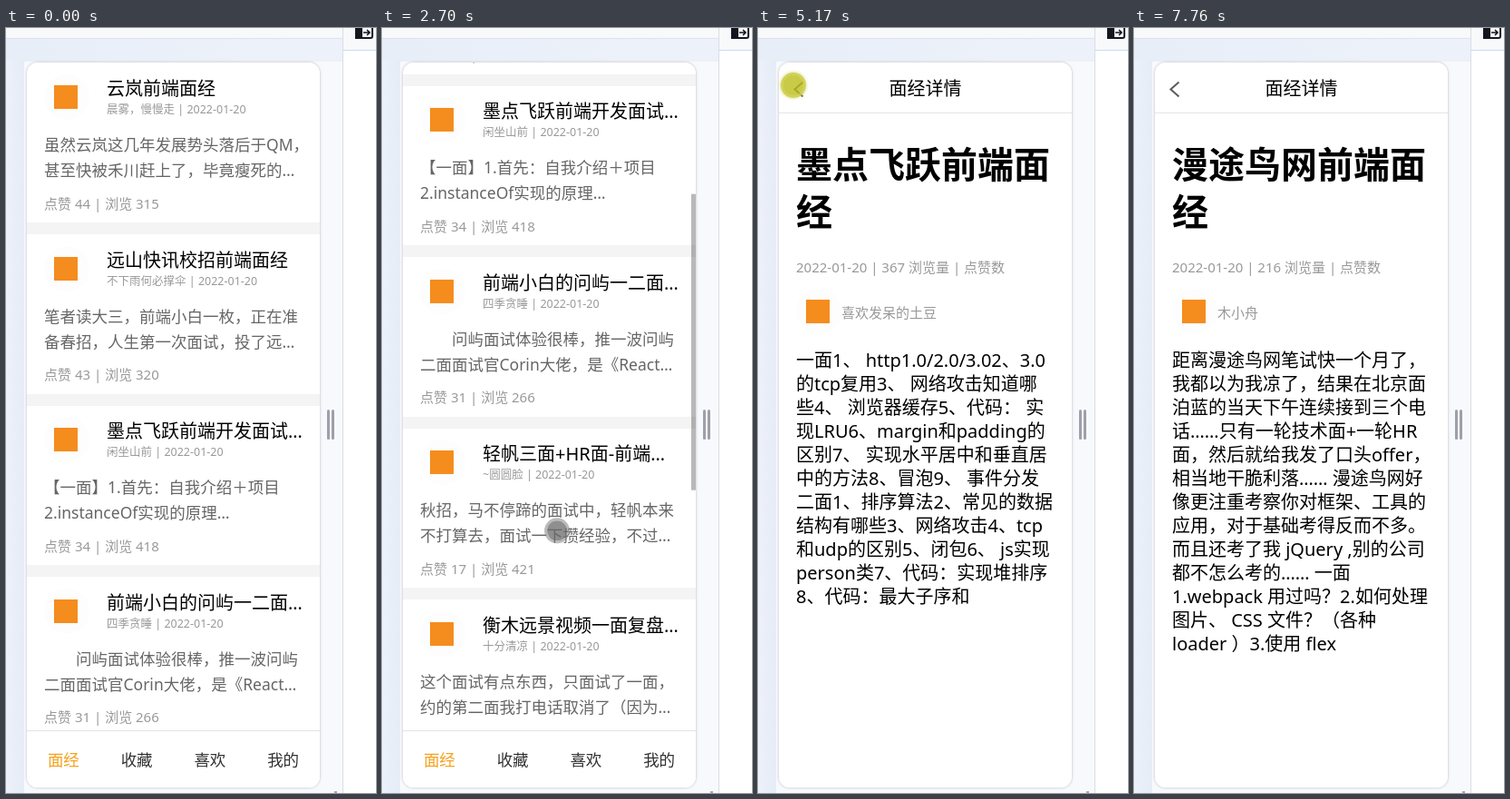
Write an HTML page that moves like this. It is 408 px wide and 842 px high and loops after 8150 ms.

```html
<!DOCTYPE html>
<html lang="zh-CN">
<head>
<meta charset="utf-8">
<title>面经</title>
<style>
html, body { margin: 0; width: 100%; height: 100%; overflow: hidden; }
body { position: relative; background: #f8f9fc; font-family: "Noto Sans", "Noto Sans CJK SC", "Noto Sans CJK", sans-serif; color: #000; }
div, svg { position: absolute; box-sizing: border-box; }
.text { white-space: pre; }
.top { left: 0; top: 0; width: 371px; height: 12px; background: #f8f9fb; border-bottom: 1px solid #dde2ec; }
.band { left: 0; top: 12px; width: 371px; height: 25px; background: linear-gradient(90deg, #e8eef8, #edf2fa); }
.side { left: 0; top: 36px; width: 20px; height: 806px; background: linear-gradient(90deg, #ecf1fa, #e6ecf7); }
.panel { left: 371px; top: 0; width: 37px; height: 842px; background: #fff; border-left: 1px solid #d9dce2; }
.bar { left: 0; top: 0; width: 36px; height: 25px; background: #f8f9fb; border-bottom: 1px solid #c9dcf5; }
.grip { top: 420px; width: 3px; height: 33px; border-radius: 2px; background: #9f9faa; }
.corner { left: 362px; top: 840px; width: 3px; height: 2px; background: #aaa; }
.phone { left: 23px; top: 38px; width: 323px; height: 798px; border-radius: 12px; overflow: hidden; background: #fff; }
.shadow { left: 23px; top: 38px; width: 323px; height: 798px; border-radius: 12px; box-shadow: 0 0 3px rgba(0,0,0,.28); }
.view { inset: 0; }
.item { left: 0; width: 323px; height: 189px; border-bottom: 13px solid #f4f4f4; }
.avatar { left: 19px; width: 50px; height: 50px; border-radius: 50%; background: #fdfdfd; }
.avatar::after { content: ""; position: absolute; left: 11px; top: 12px; width: 26px; height: 26px; background: #f58c1e; }
.thumb { left: 318px; top: 0; width: 5px; height: 326px; background: rgba(0,0,0,.28); }
.tabs { left: 0; top: 735px; width: 323px; height: 63px; background: #fff; border-top: 1px solid #e2e2e2; }
.tab { width: 80.75px; line-height: 63px; text-align: center; font-size: 17.5px; color: #323233; }
.tab:first-child { color: #f5a11c; }
.head { left: 0; top: 0; width: 323px; height: 56px; border-bottom: 1px solid #e4e4e4; text-align: center; line-height: 57px; font-size: 20px; }
.cursor { left: -14px; top: -14px; width: 28px; height: 28px; border-radius: 50%; background: rgba(105,105,105,.74) padding-box; border: 3px solid rgba(120,120,120,.5); }
.cursor.press { background: rgba(188,190,25,.8); border-color: rgba(215,218,110,.5); box-shadow: 0 0 3px 1px rgba(215,218,110,.6); }
</style>
</head>
<body>
<div class="top"></div><div class="band"></div><div class="side"></div>
<div class="panel"><div class="bar"></div>
  <svg width="36" height="16" fill="none" stroke="#15151f" stroke-width="2">
    <rect x="14" y="-4" width="18" height="15" rx="2"/><path d="M14-4h6v15h-6z" fill="#15151f"/><path d="M22 5h7M26 2l3 3-3 3" stroke-width="1.6"/>
  </svg>
</div>
<div class="grip" style="left:354px"></div><div class="grip" style="left:359px"></div><div class="corner"></div>
<div class="shadow"></div>
<div class="phone">
  <div class="view" id="list"><div id="items"></div></div>
  <div class="tabs" id="tabs"></div>
  <div class="thumb" id="thumb"></div>
  <div id="details"></div>
</div>
<div class="cursor" id="cursor"></div>
<script>
const LOOP = 8150, PITCH = 188.5, DATE = '2022-01-20';
const $ = id => document.getElementById(id);

// title, author, two preview lines, likes, views
const posts = [
  ['云岚前端面经', '晨雾，慢慢走', '虽然云岚这几年发展势头落后于QM，\n甚至快被禾川赶上了，毕竟瘦死的…', 44, 315],
  ['远山快讯校招前端面经', '不下雨何必撑伞', '笔者读大三，前端小白一枚，正在准\n备春招，人生第一次面试，投了远…', 43, 320],
  ['墨点飞跃前端开发面试…', '闲坐山前', '【一面】1.首先：自我介绍＋项目\n2.instanceOf实现的原理…', 34, 418],
  ['前端小白的问屿一二面…', '四季贪睡', '　　问屿面试体验很棒，推一波问屿\n二面面试官Corin大佬，是《React…', 31, 266],
  ['轻帆三面+HR面-前端…', '~圆圆脸', '秋招，马不停蹄的面试中，轻帆本来\n不打算去，面试一下攒经验，不过…', 17, 421],
  ['衡木远景视频一面复盘…', '十分清凉', '这个面试有点东西，只面试了一面，\n约的第二面我打电话取消了（因为…', 22, 167],
  ['21届秋招鲸习屋前端…', '米粒阿布', '笔试给一定的钱去买物品，算性价比\n最高的方案，用递归来写的传卡片…', 7, 547],
  ['漫途鸟网前端面经', '木小舟', '距离漫途鸟网笔试快一个月了，我都\n以为我凉了，结果在北京面泊蓝的…', 15, 216],
  ['墨点飞跃前端面经', '喜欢发呆的土豆', '一面1、 http1.0/2.0/3.02、3.0的\ntcp复用3、 网络攻击知道哪些4、…', 12, 367],
  ['前端实习一面面经', '小满不困', '面试官人很好，先聊了二十分钟项目\n然后问了一些基础，最后写了算法…', 9, 188]
];
// post index, heading, body
const articles = [
  [2, '墨点飞跃前端开\n发面试经历', `【一面】1.首先：自我介绍
＋项目2.instanceOf实现
的原理3.数组去重的方法
4.原型和原型链5.闭包的
应用场景6.事件循环机制
7.跨域的解决办法8.浏览
器缓存策略9.手写防抖和
节流【二面】1.项目难点
2.虚拟列表的实现3.前端
性能优化4.算法：二叉树
的层序遍历`],
  [8, '墨点飞跃前端面\n经', `一面1、 http1.0/2.0/3.02、3.0
的tcp复用3、 网络攻击知道哪
些4、 浏览器缓存5、代码： 实
现LRU6、margin和padding的
区别7、 实现水平居中和垂直居
中的方法8、冒泡9、 事件分发
二面1、排序算法2、常见的数据
结构有哪些3、网络攻击4、tcp
和udp的区别5、闭包6、 js实现
person类7、代码：实现堆排序
8、代码：最大子序和`],
  [7, '漫途鸟网前端面\n经', `距离漫途鸟网笔试快一个月了，
我都以为我凉了，结果在北京面
泊蓝的当天下午连续接到三个电
话……只有一轮技术面+一轮HR
面，然后就给我发了口头offer，
相当地干脆利落…… 漫途鸟网好
像更注重考察你对框架、工具的
应用，对于基础考得反而不多。
而且还考了我 jQuery ,别的公司
都不怎么考的…… 一面
1.webpack 用过吗？2.如何处理
图片、 CSS 文件？（各种
loader ）3.使用 flex`]
];

// y is the middle of the first line
const text = (str, x, y, size, color = '#000', line = 28, weight = 400) =>
  `<div class="text" style="left:${x}px;top:${y - line / 2}px;font:${weight} ${size}px/${line}px inherit;font-size:${size}px;line-height:${line}px;font-weight:${weight};color:${color}">${str}</div>`;
const avatar = y => `<div class="avatar" style="top:${y}px"></div>`;

$('items').innerHTML = posts.map(([title, author, preview, likes, views], i) =>
  `<div class="item" style="top:${i * PITCH}px">` + avatar(13) +
  text(title, 88, 29, 20) + text(`${author} | ${DATE}`, 88, 52, 12.5, '#999') +
  text(preview, 19, 90, 17.5, '#666') + text(`点赞 ${likes} | 浏览 ${views}`, 19, 154.5, 15, '#999') + '</div>').join('');

$('tabs').innerHTML = ['面经', '收藏', '喜欢', '我的'].map((name, i) =>
  `<div class="tab" style="left:${i * 80.75}px">${name}</div>`).join('');

$('details').innerHTML = articles.map(([i, heading, body]) =>
  '<div style="width:323px;height:798px"><div class="head">面经详情</div>' +
  '<svg width="40" height="56" fill="none" stroke="#5c5c5c" stroke-width="2"><path d="M26.5 21.5l-9 8 9 8"/></svg>' +
  text(heading, 19, 112, 40, '#000', 52, 700) + text(`${DATE} | ${posts[i][4]} 浏览量 | 点赞数`, 19, 225, 15, '#999') +
  avatar(249) + text(posts[i][1], 69, 275, 15, '#999') + text(body, 19, 328, 20, '#000', 26) + '</div>').join('');

const pages = [[0, 'list'], [480, 'blank'], [850, 0], [1810, 'empty'], [2130, 'list'], [3780, 'blank'],
  [4030, 1], [5240, 'empty'], [5560, 'list'], [7010, 'blank'], [7370, 2]];
const scrollKeys = [[0, 0], [2400, 0], [3090, 807], [3300, 950], [3780, 950], [3781, 0],
  [5780, 0], [6100, 442], [6450, 690], [7010, 690], [7011, 0]];
const scrolling = [[2400, 3300], [5780, 6450]];
const clicks = [410, 1740, 3710, 5170, 6940];
const path = [[60, 336, 765], [130, 228, 600], [200, 125, 477], [1130, 125, 477], [1670, 36, 71], [1810, 36, 71],
  [2000, 120, 232], [2350, 193, 560], [3090, 193, 546], [3300, 193, 546], [3570, 188, 666], [4390, 188, 666],
  [4950, 15, 75], [5170, 39, 63], [5240, 39, 63], [5700, 188, 500], [6100, 188, 512], [6500, 188, 512],
  [6810, 162, 750], [7370, 162, 750], [7500, 230, 775], [7700, 352, 828]];

const at = (keys, t, column) => {
  const n = keys.findIndex(k => k[0] > t);
  if (n < 1) return keys[n < 0 ? keys.length - 1 : 0][column];
  const a = keys[n - 1], b = keys[n];
  return a[column] + (b[column] - a[column]) * (t - a[0]) / (b[0] - a[0]);
};
const show = (el, on) => { el.style.display = on ? 'block' : 'none'; };

function draw() {
  const t = performance.now() % LOOP;
  const page = pages.filter(p => p[0] <= t).pop()[1];
  const scroll = at(scrollKeys, t, 1);
  show($('list'), page === 'list');
  show($('tabs'), page === 'list' || page === 'empty');
  [...$('details').children].forEach((el, i) => show(el, page === i));
  $('items').style.transform = `translateY(${-scroll}px)`;

  const span = scrolling.find(s => t >= s[0] && t < s[1] + 500);
  show($('thumb'), page === 'list' && span);
  if (span) $('thumb').style.opacity = Math.min(1, (span[1] + 500 - t) / 200);
  $('thumb').style.transform = `translateY(${scroll * .411}px)`;

  const cursor = $('cursor');
  show(cursor, t >= 60 && t < 7740);
  cursor.classList.toggle('press', clicks.some(c => t >= c && t < c + 70));
  cursor.style.transform = `translate(${at(path, t, 1)}px,${at(path, t, 2)}px)`;
  requestAnimationFrame(draw);
}
draw();
</script>
</body>
</html>
```
